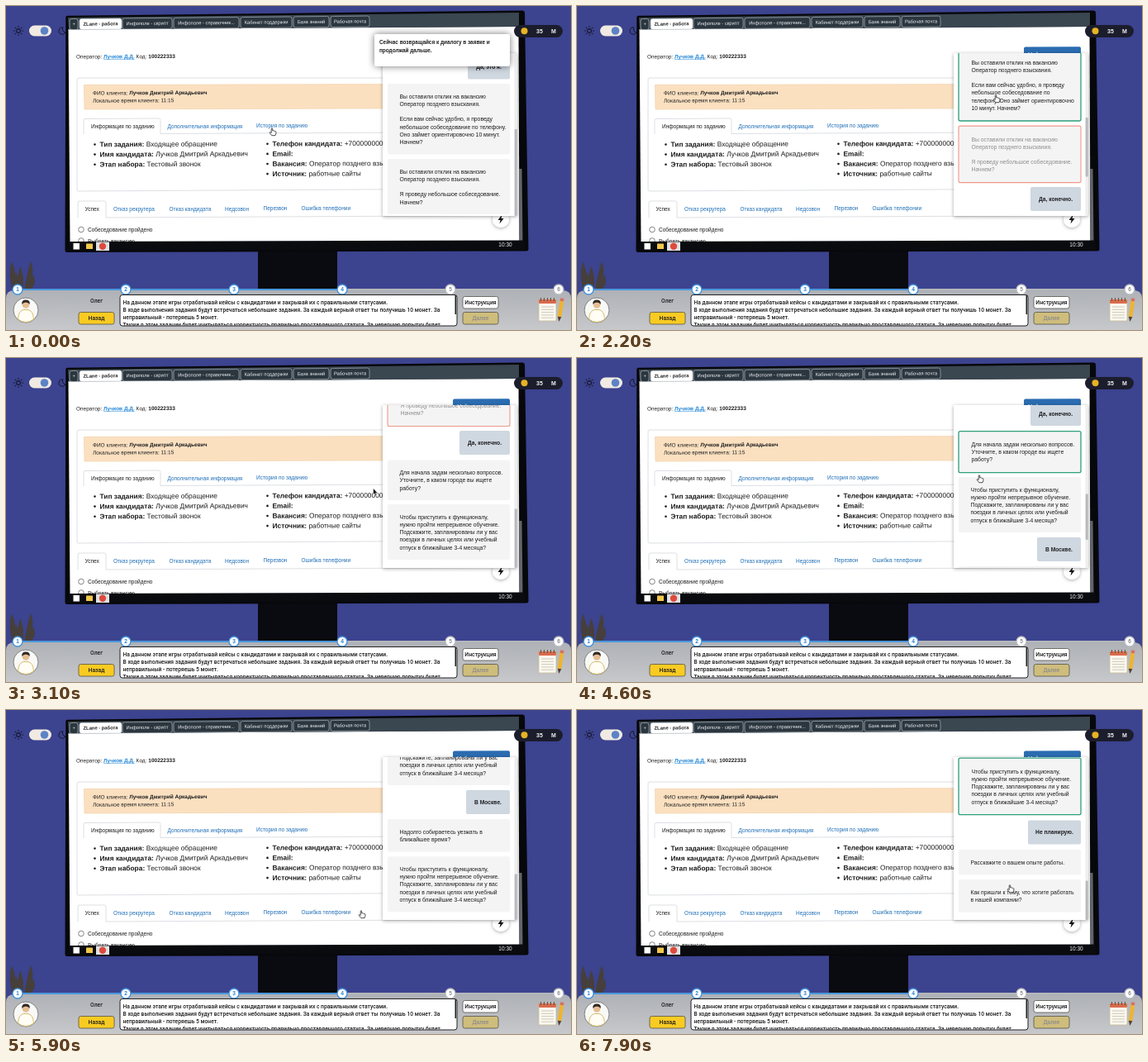
An HTML page that plays this animation: 684 by 392 pixels, repeating every 8.3 s.

```html
<!DOCTYPE html>
<html lang="ru">
<head>
<meta charset="utf-8">
<style>
html, body { margin: 0; width: 100%; height: 100%; overflow: hidden; background: #3c438f; }
svg { display: block; }
text { font-family: "Liberation Sans", Arial, sans-serif; fill: #1d1d1f; }
.b { font-weight: 700; }
.link { fill: #1f6fb5; }
.ui { font-family: Roboto, sans-serif; font-weight: 500; }
.mid { text-anchor: middle; }
.light { fill: #f1f2f4; }
.faded { fill: #8d8d8d; }
</style>
</head>
<body>
<svg id="stage" width="684" height="392" viewBox="0 0 684 392"></svg>
<script>
const LOOP = 8300, STEP = 100;
const VIEW_TOP = 57, VIEW_H = 197, FIRST_SCROLL = 173;

const text = (x, y, size, str, cls = '') =>
  `<text x="${x}" y="${y}" font-size="${size}" class="${cls}">${str}</text>`;
const rect = (x, y, w, h, fill, r = 0, extra = '') =>
  `<rect x="${x}" y="${y}" width="${w}" height="${h}" rx="${r}" fill="${fill}" ${extra}/>`;
const circle = (x, y, r, fill, extra = '') =>
  `<circle cx="${x}" cy="${y}" r="${r}" fill="${fill}" ${extra}/>`;
const path = (d, fill, extra = '') => `<path d="${d}" fill="${fill}" ${extra}/>`;
const bold = s => `<tspan class="b">${s}</tspan>`;
const tilt = (deg, x, y, s) => `<g transform="rotate(${deg} ${x} ${y})">${s}</g>`;
const stroke = (color, w = 1) => `stroke="${color}" stroke-width="${w}"`;

function room() {
  let s = rect(0, 0, 684, 392, '#3c438f');
  for (const [x, tipX, tipY] of [[8, 7, 309], [16, 17, 315], [22, 30, 309], [12, 12, 322], [22, 33, 325]])
    s += path(`M${x} 345Q${tipX - 5} ${tipY + 14} ${tipX} ${tipY}Q${tipX + 6} ${tipY + 13} ${x + 4} 345Z`, '#463f3a');
  // day/night switch
  s += circle(15, 30, 2.4, 'none', stroke('#15172a', 1.1));
  for (let a = 0; a < 360; a += 45)
    s += `<path d="M15 25.8v-1.8" ${stroke('#15172a')} transform="rotate(${a} 15 30)"/>`;
  s += path('M69 26a4.2 4.2 0 1 0 3 6a4 4 0 0 1 -3 -6Z', 'none', stroke('#15172a'));
  return s + rect(28, 23.5, 27, 13, '#f0eae2', 6.5) + circle(46.5, 30, 4.8, '#5c82c6');
}

const coins = () => rect(615, 23, 59, 15, '#1b1d2c', 7.5) + circle(627.5, 30.2, 4, '#e6b423') +
  text(646, 33, 7, '35', 'b light mid') + text(663, 33, 7, 'М', 'b light mid');

function browserTabs() {
  let s = path('M75 14L621 8V25L76 28.5Z', '#3a4650');
  const tabs = [[77, 10, '+'], [89, 51, 'ZLane - работа'], [141, 60, 'Инфополе - скрипт'],
    [203, 79, 'Инфополе - справочник...'], [284, 62, 'Кабинет поддержки'],
    [348, 43, 'База знаний'], [393, 47, 'Рабочая почта']];
  tabs.forEach(([x, w, label], i) => {
    const on = i === 1, y = 15.6 - (x - 77) * .0098;
    s += tilt(-.55, x, y, rect(x, y, w, 13, on ? '#fff' : '#2b363f', 2.5, stroke('#bcc4c9', .6)) +
      text(x + w / 2, y + 8.3, 5.8, label, 'mid ' + (on ? 'b' : 'light')));
  });
  return s;
}

function page() {
  const line = stroke('#d9dce0', .9);
  let s = path('M75.500 28L620.500 25L621.500 286H77.500Z', '#fff') + browserTabs();
  s += tilt(-.3, 85, 63, text(85, 63.6, 6.5,
    `Оператор: <tspan class="b" fill="#1f85d6" text-decoration="underline">Лучков Д.Д.</tspan> Код: ${bold('100222333')}`));
  s += tilt(-.3, 541, 49.500, rect(541, 49.500, 69, 14, '#2a6cb0', 2)) + text(546, 60.500, 6.5, 'Мой диалог', 'light');
  s += path('M610 87L88 87Q86 87 86 89V222Q86 224 88 224L610 221', 'none', line);
  s += path('M94.500 95.500L600 94.300V123.500L95 125Z', '#fbe0c0', stroke('#f3d2a8', .7));
  s += tilt(-.3, 105, 107, text(105, 107.6, 6.5, `ФИО клиента: ${bold('Лучков Дмитрий Аркадьевич')}`) +
    text(105, 116.8, 6.5, 'Локальное время клиента: 11:15'));
  s += path('M94 155V138.500Q94 136.500 96 136.500L185 136Q187 136 187 138V154.500L600 152.500', 'none', line);
  s += text(103, 148.2, 6.5, 'Информация по заданию') +
    text(195.500, 147.6, 6.5, 'Дополнительная информация', 'link') +
    text(303, 147.2, 6.5, 'История по заданию', 'link');

  const list = (x, y, rows) => rows.forEach(([key, value], i) => {
    const ly = y + i * 12.1;
    s += circle(x - 6, ly - 2.8, 1.3, '#1d1d1f') +
      tilt(-.3, x, ly, text(x, ly, 8.4, `${bold(key + ':')} ${value}`));
  });
  list(113.5, 170.3, [['Тип задания', 'Входящее обращение'],
    ['Имя кандидата', 'Лучков Дмитрий Аркадьевич'], ['Этап набора', 'Тестовый звонок']]);
  list(322.5, 169.6, [['Телефон кандидата', '+70000000000'], ['Email', ''],
    ['Вакансия', 'Оператор позднего взыскания'], ['Источник', 'работные сайты']]);

  s += path('M87 256.500V238Q87 236 89 236H119Q121 236 121 238V256L619 253.500', 'none', line);
  s += text(95.5, 248.3, 6.5, 'Успех');
  for (const [x, label] of [[130, 'Отказ рекрутера'], [197.5, 'Отказ кандидата'],
    [265, 'Недозвон'], [311.5, 'Перезвон'], [357.5, 'Ошибка телефонии']])
    s += text(x, 248.1 - (x - 130) * .004, 6.5, label, 'link');
  ['Собеседование пройдено', 'Выбрать вакансию'].forEach((label, i) => {
    s += circle(91, 270.5 + i * 13.5, 3.3, '#fff', stroke('#666', .8)) + text(99, 273.4 + i * 13.2, 6.5, label);
  });
  s += circle(599, 258, 10, '#fff', 'filter="url(#shadow)"') + path('M600.500 252.500L595.500 259H598.500L597.500 263.500L602.500 257H599.500Z', '#111');
  return s + path('M621 197H624.500L625.500 286H621.500Z', '#62656b');
}

function monitor() {
  let s = rect(305, 296, 96, 50, '#0a0b10');
  s += path('M74.500 11.800L625 5.500Q627.800 5.500 628 8L632.500 294.500Q632.500 296.500 630 296.500L74 298Q71.500 298 71.500 296L72.300 14Q72.300 11.800 74.500 11.800Z', '#07080b');
  s += page();
  s += path('M76 285L628 283.500V295H76Z', '#0a0b0f');
  s += rect(81.5, 287, 7.5, 7.5, '#fff') + rect(97, 287.5, 8, 6.500, '#f2c94c', .6);
  s += rect(109, 285.5, 16, 10.5, '#dfe2e4') + circle(117, 290.7, 4.2, '#dd4b3e');
  return s + text(604.5, 291, 6.5, '10:30', 'light mid');
}

function footer() {
  let s = path('M0 392V354Q0 344 10 344H674Q684 344 684 354V392Z', 'url(#metal)');
  s += path('M13 343H407', 'none', stroke('#4a97dd', 2)) + path('M407 343H669', 'none', stroke('#b4b7bd', 2));
  for (let i = 0; i < 6; i++) {
    const x = 14 + i * 131, on = i < 4;
    s += circle(x, 343, 6, '#fff', stroke(on ? '#3f91dc' : '#b9bcc1', 1.3)) +
      `<text x="${x}" y="345.4" font-size="6.6" class="b mid" style="fill:${on ? '#2f80cc' : '#8b8e94'}">${i + 1}</text>`;
  }
  // player silhouette
  s += circle(24, 368, 15, '#f8f8f6', stroke('#777', .9));
  s += path('M14.500 379Q15 369 21 367.500H27Q33 369 33.500 379Q29 382.500 24 382.500Q19 382.500 14.500 379Z', '#fffdf5', stroke('#d4b55a', .9));
  s += circle(24, 361.500, 4.300, '#e6bd93') + path('M19.300 361Q18.500 355.500 24 355.500Q29.500 355.500 28.700 361Q27 358.500 24 358.500Q21 358.500 19.300 361Z', '#2f2927');
  s += text(109.5, 358.6, 6.8, 'Олег', 'ui mid');

  const button = (x, y, label, fill, cls = '') =>
    rect(x, y, 43, 14.5, fill, 2.5, stroke('#55524a', .8)) + text(x + 21.5, y + 9.7, 6.8, label, 'ui mid ' + cls);
  s += button(88, 370.5, 'Назад', '#f9cb22') + button(553, 351.5, 'Инструкция', '#fff') +
    button(553, 370.5, 'Далее', '#cfbd7c', 'faded');

  s += rect(138, 349.5, 408, 37.500, '#fff', 3, stroke('#222', 1));
  const lines = ['На данном этапе игры отрабатывай кейсы с кандидатами и закрывай их с правильными статусами.',
    'В ходе выполнения задания будут встречаться небольшие задания. За каждый верный ответ ты получишь 10 монет. За',
    'неправильный - потеряешь 5 монет.',
    'Также в этом задании будет учитываться корректность правильно проставленного статуса. За неверную попытку будет'];
  s += '<svg x="139" y="350" width="406" height="36.5" viewBox="139 350 406 36.5">' +
    lines.map((l, i) => text(141.5, 360.6 + i * 9.05, 6.7, l, 'ui')).join('') +
    rect(543.5, 350, 2, 23, '#222') + '</svg>';

  // notepad with pencil
  s += rect(645, 355, 21, 26, '#fbf8ee', 1, stroke('#c9bb9a', .8)) + rect(645, 355, 21, 5, '#d96b4b', 1);
  for (let i = 0; i < 5; i++)
    s += path(`M${647.5 + i * 4} 353V357`, 'none', stroke('#555', 1)) +
      path(`M648 ${364 + i * 3.3}H663`, 'none', stroke('#b9b4a6', .7));
  s += tilt(8, 671, 368, rect(669, 357, 4.5, 19, '#efb32d') + rect(669, 353.5, 4.5, 3.5, '#d9705f', 1) +
    path('M669 376H673.500L671.250 382Z', '#4c4034'));
  return s;
}

const defs = `<defs>
  <linearGradient id="metal" x2="0" y2="1"><stop stop-color="#aeb1b6"/><stop offset="1" stop-color="#c6c8cb"/></linearGradient>
  <filter id="shadow" x="-20%" y="-20%" width="140%" height="150%"><feDropShadow dx="0" dy="1" stdDeviation="2" flood-opacity=".35"/></filter>
  <filter id="glow" x="-20%" y="-50%" width="140%" height="200%"><feDropShadow dx="0" dy="0" stdDeviation="4" flood-opacity=".55"/></filter>
</defs>`;

const intro = ['Вы оставили отклик на вакансию', 'Оператор позднего взыскания.', ''];
const study = ['Чтобы приступить к функционалу,', 'нужно пройти непрерывное обучение.',
  'Подскажите, запланированы ли у вас', 'поездки в личных целях или учебный', 'отпуск в ближайшие 3-4 месяца?'];

function option(y, lines, mark) {
  const h = lines.length * 9.2 + 21 + (mark ? 1.5 : 0);
  const border = mark === 'right' ? stroke('#2d9f7c', 1.3) : mark === 'wrong' ? stroke('#f0978a', 1.1) : '';
  const [x, dy] = mark ? [477.5, 18.5] : [476.5, 17.7];
  return rect(462, y, 148, h, '#f4f4f4', 2, border) +
    lines.map((l, i) => text(x, y + dy + i * 9.2, 6.8, l, mark === 'wrong' ? 'faded' : '')).join('');
}

const reply = (x, y, label) => rect(x, y, 610 - x, 29, '#cfd7e0', 2) +
  text((x + 610) / 2, y + 16.7, 6.7, label, 'b mid');

// Dialogue positions as seen at the first scroll offset
function dialogue(phase) {
  const longOffer = phase
    ? ['Если вам сейчас удобно, я проведу', 'небольшое собеседование по', 'телефону. Оно займет ориентировочно', '10 минут. Начнем?']
    : ['Если вам сейчас удобно, я проведу', 'небольшое собеседование по телефону.', 'Оно займет ориентировочно 10 минут.', 'Начнем?'];
  let s = reply(559, 59.5, 'Да, это я.') + option(94, [...intro, ...longOffer], phase && 'right') +
    option(phase ? 187 : 185, [...intro, 'Я проведу небольшое собеседование.', 'Начнем?'], phase && 'wrong');
  if (phase > 0) s += reply(549, 261, 'Да, конечно.') +
    option(296.5, ['Для начала задам несколько вопросов.', 'Уточните, в каком городе вы ищете', 'работу?'], phase > 1 && 'right') +
    option(phase > 1 ? 352 : 350, study);
  if (phase > 1) s += reply(557, 425, 'В Москве.') +
    option(460, ['Надолго собираетесь уезжать в', 'ближайшее время?']) +
    option(505.2, study, phase > 2 && 'right');
  if (phase > 2) s += reply(546, 580.500, 'Не планирую.') +
    option(616, ['Расскажите о вашем опыте работы.']) +
    option(652, ['Как пришли к тому, что хотите работать', 'в нашей компании?']);
  return s;
}

// [first change, scroll start, scroll target]
const phases = [[0, -1000, FIRST_SCROLL], [2200, 2069, 346], [4500, 4474, 501], [7500, 7490, 620]];

function chat(t) {
  const phase = phases.filter(p => t >= p[0]).length - 1;
  const [, start, end] = phases[phase];
  const from = phase ? phases[phase - 1][2] : end;
  const p = Math.min(1, (t - start) / 400);
  const scroll = from + (end - from) * (.5 - Math.cos(Math.PI * p) / 2);
  const scale = VIEW_H / (end + VIEW_H);
  return rect(456, VIEW_TOP, 163, VIEW_H, '#fff', 1, 'filter="url(#shadow)"') +
    `<svg x="456" y="${VIEW_TOP}" width="163" height="${VIEW_H}" viewBox="456 ${VIEW_TOP} 163 ${VIEW_H}">
      <g transform="translate(0 ${FIRST_SCROLL - scroll})">${dialogue(phase)}</g>
      ${rect(615.5, VIEW_TOP, 3.5, VIEW_H, '#eeeeef')}
      ${rect(615.7, VIEW_TOP + scroll * scale, 3.1, VIEW_H * scale, '#b9babd', 1)}</svg>`;
}

function toast(t) {
  const opacity = Math.max(0, Math.min(1, (800 - t) / 500));
  return `<g opacity="${opacity}">` + rect(446, 34, 164, 39, '#fff', 3, 'filter="url(#glow)"') +
    text(452, 46.2, 6.4, 'Сейчас возвращайся к диалогу в заявке и', 'b') +
    text(452, 55.6, 6.4, 'продолжай дальше.', 'b') + '</g>';
}

const track = [[0, 323, 152], [900, 468, 192], [1300, 492, 206], [1500, 492, 206], [1900, 508, 112],
  [2200, 508, 112], [3100, 446, 162], [3900, 446, 162], [4300, 488, 146], [5100, 488, 146],
  [5900, 431, 247], [6000, 438, 243], [6300, 519, 196], [6400, 519, 196], [7200, 525, 216], [LOOP, 525, 216]];

function cursor(t) {
  const i = track.findIndex(k => k[0] > t);
  const [t0, x0, y0] = track[i - 1], [t1, x1, y1] = track[i];
  const p = (t - t0) / (t1 - t0), e = p * p * (3 - 2 * p);
  const arrow = t >= 2600 && t < 4100;
  const shape = arrow
    ? path('M-1.500 -4.500V3.500L.3 1.900L1.600 4.700L2.900 4.100L1.600 1.400H4Z', '#111', stroke('#fff', .6))
    : path('M-1.800 -3.800Q-1 -5 -.3 -3.800V-1Q.5 -1.600 1.100 -.8Q2 -1.300 2.500 -.4Q3.800 -.8 3.900 .6V2.300L3 4.700H-1.200L-3.700 1.600Q-3.900 .2 -2.600 .7L-1.800 1.500Z', '#fff', stroke('#222', .8));
  return `<g transform="translate(${x0 + (x1 - x0) * e} ${y0 + (y1 - y0) * e})">${shape}</g>`;
}

const stage = document.getElementById('stage');
stage.innerHTML = defs + room() + monitor() + coins() + footer() + '<g id="live"></g>';
const live = document.getElementById('live');
let shown = -1;

function draw() {
  const t = Math.floor(performance.now() % LOOP / STEP) * STEP;
  if (t !== shown) {
    live.innerHTML = chat(t) + toast(t) + cursor(t);
    shown = t;
  }
  requestAnimationFrame(draw);
}
draw();
</script>
</body>
</html>
```
